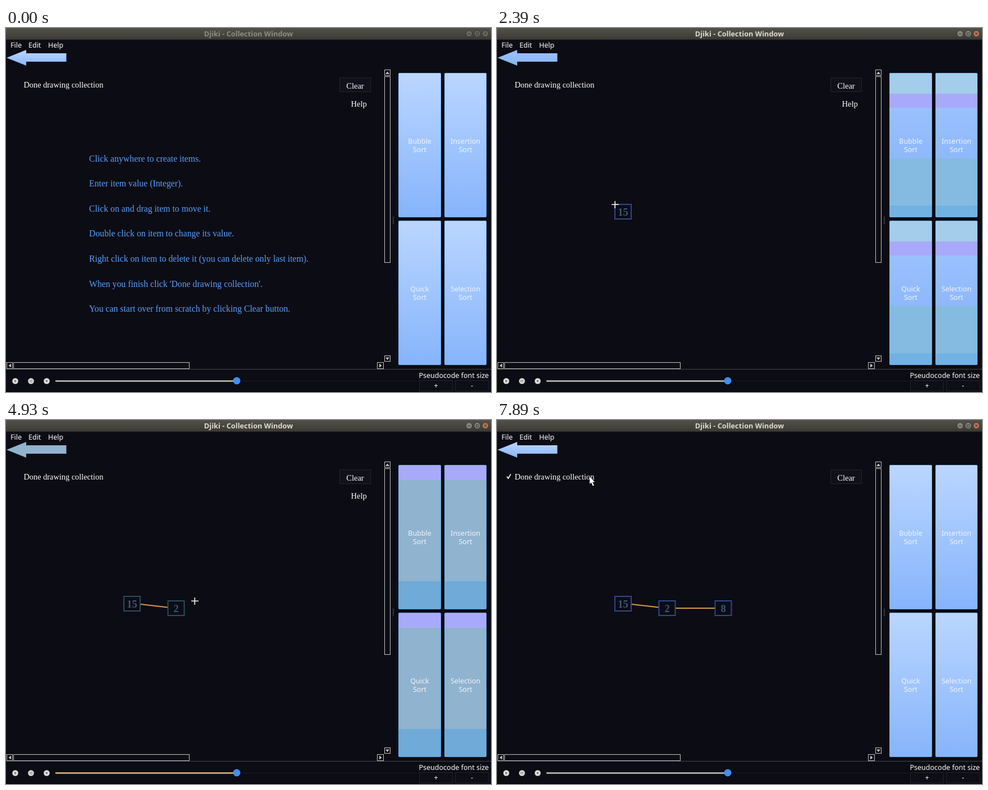
Animation of 864x648 px, one loop 7.99 s. Source, as an HTML page with a canvas:

```html
<!DOCTYPE html>
<html lang="en">
<head>
<meta charset="utf-8">
<title>Collection Window</title>
<style>
html, body { margin: 0; width: 100%; height: 100%; overflow: hidden; background: #0c0c14; }
canvas { display: block; }
</style>
</head>
<body>
<canvas id="stage" width="864" height="648"></canvas>
<script>
const c = document.getElementById('stage').getContext('2d');
const LOOP = 7990;
const SANS = '12.5px "Noto Sans", sans-serif';
const BOLD = 'bold 12.8px "Noto Sans", sans-serif';
const serif = (size, weight = '') => `${weight} ${size}px "Liberation Serif", serif`;

// Colour moods of the window; bands are [end offset, top colour, bottom colour]
const base = {
  bg: '#0c0c14', text: '#fff', title: '#dfdbd2', label: '#eff3fb', knob: '#4090f5',
  track: '#a9a9a1', box: '#2f4890', digit: '#385a74', link: '#d8994f', dot: '#dcdcda',
  edge: '#c4c4c2', shadow: 0,
  arrow: [[28, '#bcd7ff', '#88b5fc']],
  bands: [[257, '#bad6ff', '#86b4fb']]
};
const blueArrow = [[5, '#a5aefc'], [20, '#9bbffd', '#8cb8fa'], [28, '#85bce0']];
const banded = (a, b, d, e) => [[a, '#a3cdea'], [b, '#a9a9fb'], [d, '#9ac1fd', '#8eb8fb'],
  [e, '#85bbe0'], [257, '#72b2e2']];
const looks = {
  smooth: base,
  fresh: { ...base, arrow: blueArrow, bands: banded(29, 57, 147, 231) },
  calm: { ...base, arrow: blueArrow, bands: banded(37, 62, 152, 236) },
  late: { ...base, bands: banded(37, 62, 152, 236) },
  steel: { ...base, box: '#2f4a5e', digit: '#38557a', track: '#c0a070',
    arrow: [[28, '#90b3cf']],
    bands: [[27, '#a9a9fb'], [207, '#90b3cf'], [257, '#6faad8']] },
  half: { ...base, bg: '#090a10', text: '#c0bdb8', title: '#c9c4b8', label: '#aaa59f',
    knob: '#4080d0', track: '#d09a50', box: '#30505e', digit: '#38557a', dot: '#d4cfb8',
    shadow: .12,
    arrow: [[13, '#90b3cf'], [28, '#699cc6']],
    bands: [[90, '#90b3cf'], [127, '#8799c4'], [257, '#699cc6']] },
  dim: { ...base, bg: '#07080e', text: '#b4b0a9', title: '#bdb8aa', label: '#b3aca0',
    knob: '#2352a8', track: '#89837a', box: '#192260', digit: '#1b2868', dot: '#a5a296',
    link: '#a0703c', edge: '#aaa8a2', shadow: .3,
    arrow: [[28, '#5288b0']],
    bands: [[22, '#a5a296'], [247, '#5288b0'], [257, '#4c7796']] }
};

const dialogs = [
  { open: 1310, close: 2190, typed: [[1850, '1'], [1950, '15']], before: 'fresh', after: 'calm' },
  { open: 3260, close: 4500, typed: [[4190, '2']], before: 'calm', after: 'steel' },
  { open: 5490, close: 6390, typed: [[6050, '8']], before: 'steel', after: 'late' }
];
const items = [[210, 314, '15'], [288.5, 322, '2'], [388.5, 322, '8']];
const path = [[400, 741, 361], [510, 526, 391], [680, 526, 391], [840, 210, 314],
  [2480, 210, 314], [2840, 288, 322], [4750, 288, 322], [5130, 388, 322],
  [6520, 388, 322], [6920, 209, 92], [7070, 209, 92], [7350, 165, 101]];
const hints = ['Click anywhere to create items.', 'Enter item value (Integer).',
  'Click on and drag item to move it.', 'Double click on item to change its value.',
  'Right click on item to delete it (you can delete only last item).',
  "When you finish click 'Done drawing collection'.",
  'You can start over from scratch by clicking Clear button.'];

function text(s, x, y, color, font = SANS, align = 'left') {
  c.font = font; c.fillStyle = color; c.textAlign = align;
  c.fillText(s, x, y);
}
function rect(x, y, w, h, fill) { c.fillStyle = fill; c.fillRect(x, y, w, h); }
function frame(x, y, w, h, color, fill) {
  if (fill) rect(x, y, w, h, fill);
  c.strokeStyle = color; c.lineWidth = 1;
  c.strokeRect(x + .5, y + .5, w - 1, h - 1);
}
function disc(x, y, r, fill) {
  c.fillStyle = fill; c.beginPath(); c.arc(x, y, r, 0, 7); c.fill();
}
function poly(points, fill) {
  c.beginPath(); points.forEach(p => c.lineTo(...p)); c.closePath();
  c.fillStyle = fill; c.fill();
}
function line(points, color, width) {
  c.beginPath(); points.forEach(p => c.lineTo(...p));
  c.strokeStyle = color; c.lineWidth = width; c.stroke();
}
function shade(y0, y1, a, b) {
  const g = c.createLinearGradient(0, y0, 0, y1);
  g.addColorStop(0, a); g.addColorStop(1, b);
  return g;
}
function bands(list, x, y, w) {
  let top = 0;
  for (const [end, a, b = a] of list) {
    rect(x, y + top, w, end - top, shade(y + top, y + end, a, b));
    top = end;
  }
}
function clipped(shape, draw) {
  c.save(); c.beginPath(); shape(); c.clip(); draw(); c.restore();
}

function mood(t) {
  if (t >= 7800) return 'smooth';
  const d = dialogs.findLast(d => t >= d.open);
  if (!d) return 'smooth';
  const shown = t - d.open, gone = t - d.close;
  if (gone >= 150) return d.after;
  if (gone >= 50) return 'half';
  return shown < 320 ? d.before : shown < 400 ? 'half' : 'dim';
}

function sortButton(x, y, w, name, look) {
  clipped(() => c.roundRect(x, y, w, 257, 2), () => bands(look.bands, x, y, w));
  c.beginPath(); c.roundRect(x + .5, y + .5, w - 1, 256, 2);
  c.strokeStyle = 'rgba(90,160,240,.45)'; c.lineWidth = 1; c.stroke();
  text(name, x + w / 2, y + 126, look.label, SANS, 'center');
  text('Sort', x + w / 2, y + 141, look.label, SANS, 'center');
}

function scrollBars(edge) {
  for (const b of [[674, 74, 11, 11], [674, 86, 11, 332], [674, 583, 11, 11],
    [1, 595, 11, 12], [13, 595, 314, 12], [661, 595, 12, 12]]) frame(...b, edge);
  poly([[676, 82], [679.5, 77.5], [683, 82]], edge);
  poly([[676, 586.5], [679.5, 591], [683, 586.5]], edge);
  poly([[9, 597.5], [4.5, 601], [9, 604.5]], edge);
  poly([[665, 597.5], [669.5, 601], [665, 604.5]], edge);
}

function player(look) {
  rect(0, 607, 864, 1, '#46464c');
  rect(411, 628, 321, 1, '#171820');
  rect(88, 627, 323, 3, look.track);
  disc(411, 628, 6.5, look.knob);
  for (const x of [16.5, 44.5, 72.5]) disc(x, 628.5, 5.3, look.dot);
  poly([[15, 626], [19, 628.5], [15, 631]], '#777');
  rect(42.5, 626, 1, 5, '#666');
  rect(45.5, 626, 1, 5, '#666');
  rect(71, 627, 3, 3, '#777');
  text('Pseudocode font size', 735.5, 623, look.text);
  frame(736, 627, 60, 20, '#22232c', '#0e0e17');
  frame(800, 627, 61, 20, '#22232c', '#0e0e17');
  text('+', 766, 641, look.text, SANS, 'center');
  text('-', 830, 641, look.text, SANS, 'center');
  rect(0, 647, 864, 1, '#000');
}

function titleBar(active, look) {
  rect(0, 0, 864, 21, shade(0, 21, '#53524a', '#3a3933'));
  rect(0, 20, 864, 1, '#2b2a26');
  [825, 839.5, 854].forEach((x, i) => {
    disc(x, 10, 6, '#35342f');
    disc(x, 10, 5.2, !active ? '#68665e' : i < 2 ? '#85827a' : '#b27252');
  });
  line([[822.5, 10.5], [827.5, 10.5]], '#3b3a35', 1);
  frame(837, 8, 5, 5, '#3b3a35');
  line([[852, 8], [856, 12]], '#3b3a35', 1);
  line([[856, 8], [852, 12]], '#3b3a35', 1);
  rect(0, 0, 864, 21, `rgba(0,0,0,${look.shadow})`);
  text('Djiki - Collection Window', 432, 15, active ? look.title : '#8f8c82', BOLD, 'center');
}

function mainWindow(t, look) {
  rect(0, 0, 864, 648, look.bg);
  titleBar(t >= 1310, look);
  text('File', 8, 34.5, look.text);
  text('Edit', 40, 34.5, look.text);
  text('Help', 75, 34.5, look.text);
  clipped(() => [[1, 53], [36, 39], [36, 45], [107.5, 45], [107.5, 60], [36, 60], [36, 67]]
    .forEach(p => c.lineTo(...p)), () => bands(look.arrow, 0, 39, 108));

  if (look.bg !== base.bg) frame(15, 94, 13, 13, '#15161d');
  text('Done drawing collection', 31.5, 106, look.text, serif(14.35));
  frame(594, 88, 56, 26, '#22232e', '#10111a');
  text('Clear', 622, 107.5, look.text, serif(14.5), 'center');
  if (t < 7800) text('Help', 614.5, 140, look.text, serif(14.5));
  else line([[17.5, 100.5], [20, 104], [24.5, 96.5]], '#fff', 1.6);

  if (t < 1360) hints.forEach((s, i) => text(s, 148, 237.5 + i * 44.65, '#5a9ffc', serif(15.77)));

  scrollBars(look.edge);
  for (let y = 336; y < 349; y += 2) rect(689, y, 2, 1, '#55565e');
  sortButton(699, 80, 76, 'Bubble', look);
  sortButton(781, 80, 75, 'Insertion', look);
  sortButton(699, 343, 76, 'Quick', look);
  sortButton(781, 343, 75, 'Selection', look);
  player(look);
}

function collection(t, look) {
  const count = dialogs.filter(d => t >= d.close + 50).length;
  if (count > 1) line([[240, 328], [288, 333.5]], look.link, 2);
  if (count > 2) line([[318, 335], [388, 335]], look.link, 2);
  for (const [x, y, value] of items.slice(0, count)) {
    c.strokeStyle = look.box; c.lineWidth = 2;
    c.strokeRect(x, y, 29, 26);
    text(value, x + 14.5, y + 20, look.digit, serif(18.5, 'bold'), 'center');
  }
}

function dialog(t, d, index) {
  const opening = Math.min(1, (t - d.open - 50) / 110);
  const scale = t >= d.close + 50 ? .055 : opening;
  if (scale <= 0 || t >= d.close + 100) return;
  c.save();
  c.translate(0, 334); c.scale(1, scale); c.translate(0, -334);
  rect(326, 302, 213, 84, '#0b0b13');
  c.beginPath(); c.roundRect(325, 281, 214, 22, [5, 5, 0, 0]);
  c.fillStyle = shade(281, 303, '#56554c', '#3d3c37'); c.fill();
  text('Enter', 432, 296.5, '#e2ded4', BOLD, 'center');
  disc(529, 291.5, 6, '#35342f');
  disc(529, 291.5, 5.2, '#a9694c');
  line([[527, 289.5], [531, 293.5]], '#40342c', 1);
  line([[531, 289.5], [527, 293.5]], '#40342c', 1);

  text('Enter value for item with index: ' + index, 334.5, 324, '#f2f2f2');
  frame(335, 333, 195, 19, '#2b54a4', '#0b0c15');
  const typed = d.typed.findLast(([at]) => t >= at);
  if (!typed) rect(338, 335, 8, 15, '#3f8df2');
  const value = typed ? typed[1] : '0';
  text(value, 338.5, 347, '#fff');
  if (typed) rect(339 + 7 * value.length, 336, 1, 13, '#ddd');
  poly([[520, 340], [523, 336.5], [526, 340]], '#c8c8c8');
  poly([[520, 345], [523, 348.5], [526, 345]], '#c8c8c8');

  frame(405, 358, 62, 20, '#23242e', '#10111a');
  line([[409, 363.5], [418.5, 373]], '#8b908c', 3);
  line([[418.5, 363.5], [409, 373]], '#8b908c', 3);
  text('Cancel', 424, 373, '#f2f2f2');
  rect(424, 375, 8, 1, '#ddd');
  frame(472, 358, 58, 20, '#2a539c', '#111b2c');
  line([[484.5, 369], [488, 373], [494, 362.5]], '#c6b95a', 2.6);
  text('OK', 499, 373, '#f2f2f2');
  rect(499, 375, 10, 1, '#ddd');
  c.restore();
}

function pointer(t) {
  if (t < path[0][0]) return;
  const i = path.findLastIndex(p => t >= p[0]);
  const [t0, x0, y0] = path[i], [t1, x1, y1] = path[i + 1] || [LOOP, ...path[i].slice(1)];
  const k = (t - t0) / (t1 - t0);
  const x = x0 + (x1 - x0) * k, y = y0 + (y1 - y0) * k;
  const busy = dialogs.some(d => t >= d.open + 50 && t < d.close);
  c.save();
  c.translate(Math.round(x), Math.round(y));
  if (busy || x > 690 || (t > 7070 && x < 180)) {
    const tip = [[0, 0], [0, 13], [3, 10.5], [5.5, 16.5], [8, 15.5], [5.5, 9.5], [9.5, 9.5]];
    poly(tip, '#fff');
    line([...tip, [0, 0]], 'rgba(0,0,0,.35)', .6);
  } else {
    rect(-6, -.5, 13, 1.5, '#fff');
    rect(-.5, -6, 1.5, 13, '#fff');
  }
  c.restore();
}

function draw() {
  const t = performance.now() % LOOP;
  const look = looks[mood(t)];
  mainWindow(t, look);
  collection(t, look);
  dialogs.forEach((d, i) => dialog(t, d, i));
  pointer(t);
  requestAnimationFrame(draw);
}
draw();
</script>
</body>
</html>
```
